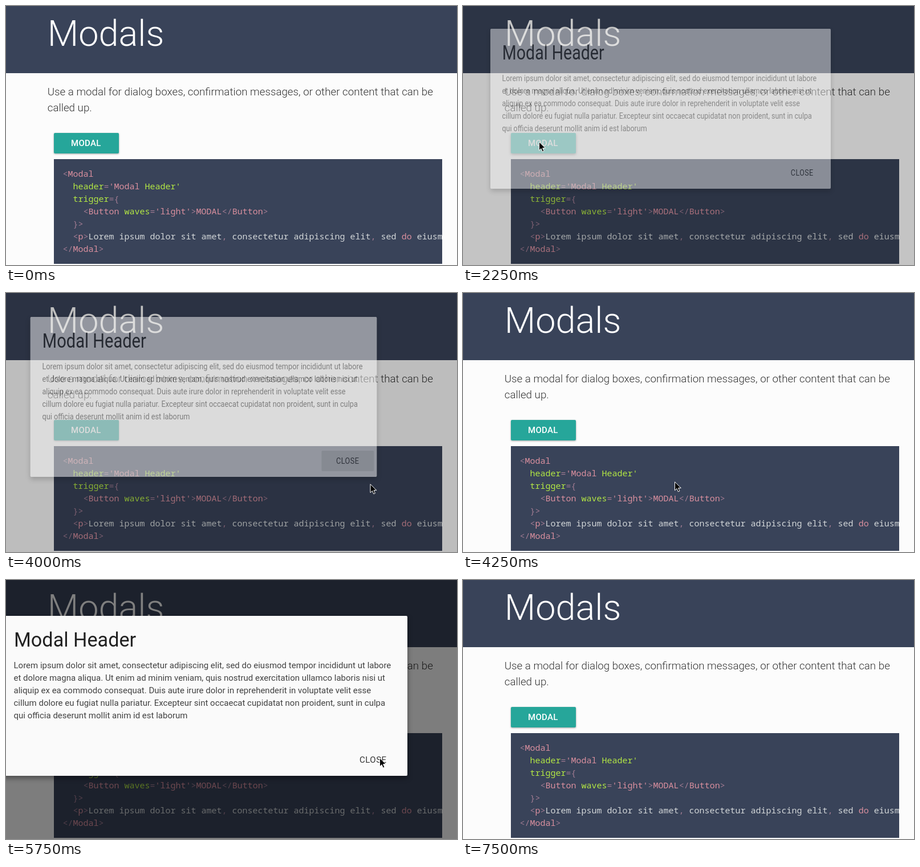
Write an HTML page that moves like this. It is 791 px wide and 455 px high and loops after 7750 ms.

```html
<!DOCTYPE html>
<html lang="en">
<head>
<meta charset="utf-8">
<title>Modals</title>
<style>
  html, body { margin: 0; width: 100%; height: 100%; overflow: hidden; background: #fcfcfc; }
  svg { display: block; width: 791px; height: 455px; }
  text { font-family: Roboto, sans-serif; white-space: pre; }
  .title { font-size: 63px; font-weight: 300; fill: #fff; }
  .lead { font-size: 18.75px; font-weight: 300; fill: #333; }
  .label { font-size: 15px; letter-spacing: .5px; }
  .code text { font: 500 15px "Noto Sans Mono", monospace; fill: #d3d7d9; }
  .code .tag { fill: #d98f9e; }
  .code .attr { fill: #b3e744; }
  .code .dim { fill: #a27c93; }
  #modalBox { filter: drop-shadow(0 4px 5px rgba(0, 0, 0, .4)); }
  .heading { font-size: 34.2px; fill: #212121; }
  .body { font-size: 15px; fill: #424242; }
</style>
</head>
<body>
<svg viewBox="0 0 791 455">
  <clipPath id="codeClip"><rect x="84" y="269" width="681" height="184"/></clipPath>
  <clipPath id="buttonClip"><rect x="84" y="223" width="114" height="36" rx="2"/></clipPath>

  <rect width="791" height="455" fill="#fcfcfc"/>
  <rect width="791" height="118" fill="#394359"/>
  <text class="title" x="72.75" y="70">Modals</text>
  <text class="lead" x="72.75" y="157">Use a modal for dialog boxes, confirmation messages, or other content that can be</text>
  <text class="lead" x="72.75" y="185">called up.</text>

  <rect id="button" x="84" y="223" width="114" height="36" rx="2"/>
  <circle id="ripple" fill="#fff" fill-opacity=".28" clip-path="url(#buttonClip)"/>
  <text class="label" x="114" y="246" fill="#fff" style="font-weight:500;letter-spacing:.3px">MODAL</text>

  <g class="code" clip-path="url(#codeClip)">
    <rect x="84" y="269" width="681" height="184" fill="#394359"/>
    <g id="code"></g>
  </g>

  <rect id="overlay" width="791" height="455"/>

  <g id="modal">
    <rect id="modalBox" x="-11" width="715" height="281" rx="2" fill="#fafafa"/>
    <text class="heading" x="14" y="54">Modal Header</text>
    <g id="paragraph"></g>
    <rect id="closeHover" x="590" y="235" width="108" height="36" rx="2" fill="#e1e1e1"/>
    <text class="label" x="620" y="258" fill="#343434">CLOSE</text>
  </g>

  <path id="cursor" d="M.5 .8V15.8L4 12.5L6.3 18L8.9 16.9L6.6 11.6H11.3Z" fill="#000" stroke="#fff"/>
</svg>
<script>
const $ = id => document.getElementById(id);

// Code markup: @tag, #attribute and ~punctuation runs, each closed by |
const codeLines = [
  "~<|@Modal|",
  "  #header|~=|@'Modal| #Header'|",
  "  #trigger|~={|",
  "    ~<|@Button| #waves|~=|@'light'|~>|@MODAL|~</|@Button|~>|",
  "  ~}>|",
  "  ~<|@p|~>|Lorem ipsum dolor sit amet~,| consectetur adipiscing elit~,| sed @do| eiusmod tempor",
  "~</|@Modal|~>|"
];
const kinds = { "@": "tag", "#": "attr", "~": "dim" };
const escapeText = s => s.replace(/</g, "&lt;").replace(/>/g, "&gt;");

$("code").innerHTML = codeLines.map((line, i) => {
  const indent = line.search(/\S/);
  const runs = escapeText(line.trim()).replace(/([@#~])([^|]*)\|/g,
    (_, mark, run) => `<tspan class="${kinds[mark]}">${run}</tspan>`);
  return `<text x="${99.5 + 9 * indent}" y="${300 + 22 * i}">${runs}</text>`;
}).join("");

$("paragraph").innerHTML = [
  "Lorem ipsum dolor sit amet, consectetur adipiscing elit, sed do eiusmod tempor incididunt ut labore",
  "et dolore magna aliqua. Ut enim ad minim veniam, quis nostrud exercitation ullamco laboris nisi ut",
  "aliquip ex ea commodo consequat. Duis aute irure dolor in reprehenderit in voluptate velit esse",
  "cillum dolore eu fugiat nulla pariatur. Excepteur sint occaecat cupidatat non proident, sunt in culpa",
  "qui officia deserunt mollit anim id est laborum"
].map((line, i) => `<text class="body" x="13.5" y="${92 + 22 * i}">${line}</text>`).join("");

const LOOP = 7750;
// Each step holds until the next; open runs from 0 (closed) to 1 (fully open).
const steps = [
  { at: 0 },
  { at: 500, cursor: [265, 22] },
  { at: 750, cursor: [165, 113] },
  { at: 1000, cursor: [153, 171] },
  { at: 1250, cursor: [151, 184] },
  { at: 1500, cursor: [133, 238], hover: .5 },
  { at: 1750, cursor: [133, 238], hover: 1 },
  { at: 2250, cursor: [133, 238], hover: 1, open: .45, ripple: 120 },
  { at: 2500, cursor: [133, 238], open: 1 },
  { at: 3000, cursor: [531, 334], open: 1 },
  { at: 3250, cursor: [583, 334], open: 1 },
  { at: 3500, cursor: [638.5, 335], open: 1, close: true },
  { at: 4000, cursor: [638.5, 335], open: .5, close: true },
  { at: 4250, cursor: [371, 331] },
  { at: 4500, cursor: [208, 289] },
  { at: 4750, cursor: [158, 254], hover: .5 },
  { at: 5000, cursor: [158, 254], hover: 1 },
  { at: 5250, cursor: [158, 254], hover: 1, open: .24, ripple: 53 },
  { at: 5500, cursor: [469, 256], open: 1 },
  { at: 5750, cursor: [655, 312], open: 1 },
  { at: 6000, cursor: [645, 319], open: 1, close: true },
  { at: 6250, cursor: [645, 319], open: .547, close: true },
  { at: 6500, cursor: [645, 319] },
  { at: 7000 }
];

const mix = (a, b, t) => a + (b - a) * t;
const MODAL_CENTER = 346.5;

function draw({ cursor, hover = 0, open = 0, close = false, ripple = 0 }) {
  const [x, y] = cursor || [-50, -50];
  $("cursor").setAttribute("transform", `translate(${x} ${y})`);

  $("button").style.fill = `rgb(${mix(38, 43, hover)}, ${mix(166, 187, hover)}, ${mix(154, 173, hover)})`;
  $("button").style.filter =
    `drop-shadow(0 ${mix(1, 2, hover)}px ${mix(1.5, 2.5, hover)}px rgba(0, 0, 0, .35))`;
  $("ripple").setAttribute("cx", x + 1);
  $("ripple").setAttribute("cy", y);
  $("ripple").setAttribute("r", ripple);

  $("overlay").style.opacity = open / 2;
  $("modal").style.opacity = open;
  $("modal").setAttribute("transform",
    `translate(${MODAL_CENTER} ${mix(21, 63, open)}) scale(${mix(.7, 1, open)} 1) translate(${-MODAL_CENTER} 0)`);
  $("closeHover").style.opacity = close ? 1 : 0;
}

const start = performance.now();
let shown;
function tick() {
  const time = (performance.now() - start) % LOOP;
  const step = steps.findLast(s => s.at <= time);
  if (step !== shown) draw(shown = step);
  requestAnimationFrame(tick);
}
tick();
</script>
</body>
</html>
```
